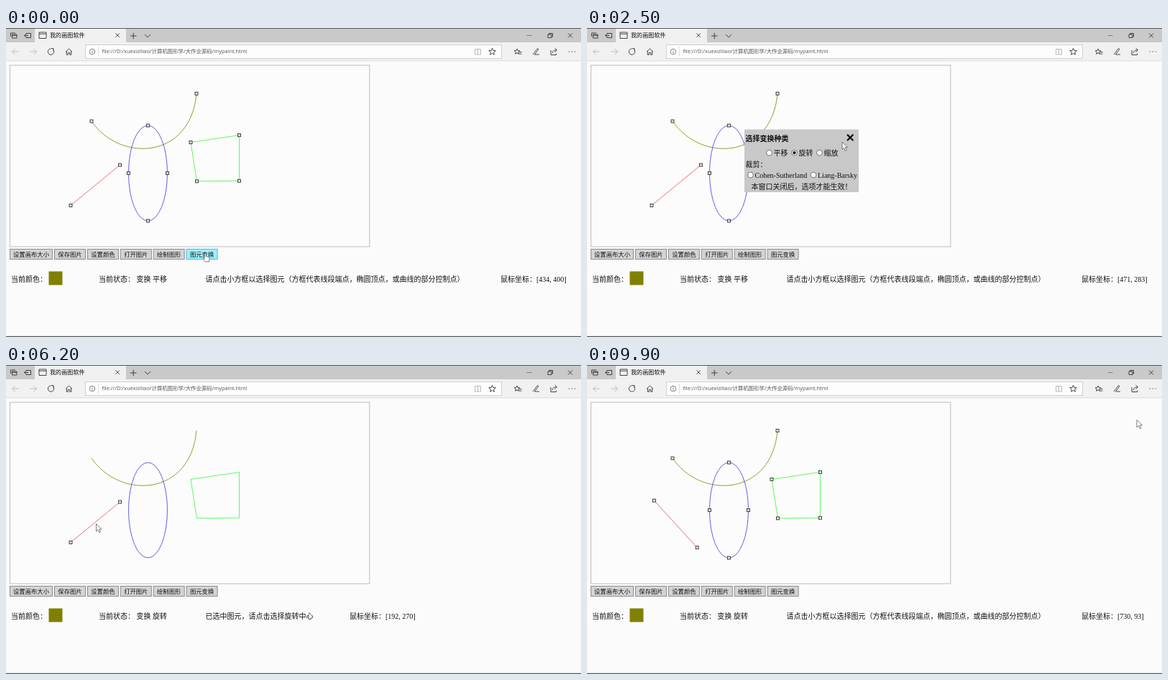
These frames come from a looping animation (800x431 px, 10 s). An HTML page:

```html
<!DOCTYPE html>
<html>
<head>
<meta charset="utf-8">
<title>我的画图软件</title>
<style>
html, body { margin: 0; width: 100%; height: 100%; overflow: hidden; background: #fbfbfb; }
svg { display: block; width: 800px; height: 431px; }
text { font: 10px 'Liberation Serif', 'Noto Sans CJK SC', 'Noto Sans CJK JP', serif; fill: #111; white-space: pre; text-spacing-trim: space-all; }
.ui { font-family: 'Open Sans', 'Noto Sans CJK SC', sans-serif; }
.ico { fill: none; stroke: #333; stroke-width: .9; }
.dim { stroke: #b4b4b4; }
.mid { stroke: #777; }
.shape { fill: none; stroke-width: .8; }
.grip { fill: #e4e4e4; stroke: #333; stroke-width: .9; }
.btn rect { fill: #d4d4d4; stroke: #8c8c8c; }
.btn.hot rect { fill: #a0eefb; stroke: #45bfe0; }
.btn text { font-size: 8.33px; }
.ring { fill: #fff; stroke: #555; stroke-width: .8; }
.ptr { fill: #fff; stroke: #555; stroke-width: .75; stroke-linejoin: round; }
</style>
</head>
<body>
<svg viewBox="0 0 800 431" xmlns="http://www.w3.org/2000/svg">
  <rect width="800" height="20" fill="#c9c9c9"/>
  <rect width="800" height="1" fill="#555"/>
  <rect x="40" y="1" width="127" height="20" fill="#f0f0f0"/>
  <rect y="20" width="800" height="26" fill="#f1f1f1"/>
  <rect y="45.5" width="800" height=".8" fill="#d8d8d8"/>
  <rect x="110.5" y="23.5" width="579" height="19" fill="#fdfdfd" stroke="#d0d0d0"/>
  <path d="M128.5 26V40" stroke="#ddd"/>
  <text class="ui" x="61" y="13.4" style="font-size:8.1px">我的画图软件</text>
  <text class="ui" x="133.5" y="35.3" style="font-size:7.4px;fill:#555">file:///D:/xuexiziliao/计算机图形学/大作业源码/mypaint.html</text>
  <g id="icons"></g>

  <rect x="5.5" y="52" width="500.3" height="253" fill="#fcfcfc" stroke="#bcbcbc"/>
  <g id="shapes"></g>
  <path class="shape" stroke="#f04a4a" id="line"/>
  <g id="others"></g>
  <g id="ends"></g>
  <g id="pivot"></g>
  <g id="buttons"></g>

  <text x="7" y="353.5">当前颜色：</text>
  <rect x="59.5" y="339.5" width="19" height="19" fill="#808000"/>
  <text x="129" y="353.5" id="mode"></text>
  <text x="277.5" y="353.5" id="hint"></text>
  <text y="353.5" id="coord"></text>

  <g id="dialog">
    <rect x="219" y="141.5" width="159" height="87.5" fill="#c8c8c8"/>
    <text x="220.5" y="158" style="font-weight:bold">选择变换种类</text>
    <text x="220.5" y="194">裁剪：</text>
    <text x="228.5" y="225">本窗口关闭后，选项才能生效！</text>
    <g id="radios"></g>
    <circle id="dot" cy="174" r="2.2" fill="#222"/>
  </g>
  <rect y="429.8" width="800" height="1.2" fill="#555"/>
  <g id="cursor">
    <path class="ptr" id="arrow" d="M.5 .5V11L3 8.7L4.7 12.7L6.5 12L4.8 8H8Z"/>
    <path class="ptr" id="hand" d="M-.8 .8Q.2 -.6 1.2 .8V4.500L5.500 5.500Q6.500 6 5.500 12H.3L-3 7.500Q-3 6 -.8 7.500Z"/>
    <path id="beam" d="M-2 -5H3M.5 -5V5M-2 5H3" fill="none" stroke="#222"/>
  </g>
</svg>
<script>
const $ = id => document.getElementById(id);
const show = (id, on) => $(id).style.display = on ? '' : 'none';

const LOOP = 10000, STEP = 100;
const OPEN = 500, PICK = 1800, CLOSE = 3000, SELECT = 4900, CENTER = 6400, TURN = 8800;

const hints = {
  choose: '请点击小方框以选择图元（方框代表线段端点，椭圆顶点，或曲线的部分控制点）',
  center: '已选中图元，请点击选择旋转中心',
  angle: '已选中旋转中心，由红色小方框标出，请点击选择旋转角度'
};

// Pointer stops: arrival time, x, y, rest
const stops = [
  [0, 277, 314, 600], [1050, 299.4, 228.9, 0], [1400, 302, 181, 0], [1700, 289, 175, 300],
  [2500, 354.5, 158.5, 0], [2800, 366, 153, 200], [3450, 155.6, 165.8, 0], [3500, 154, 169.5, 0],
  [4000, 158.8, 190.8, 1400], [6000, 125, 221, 1000], [7350, 122.5, 195.1, 50],
  [8000, 122.5, 171, 1300], [9700, 461.3, 110.1, 0], [9900, 764.5, 76, 100]
];

function pointer(t) {
  const i = stops.findLastIndex(s => s[0] <= t);
  const [at, x, y, rest] = stops[i], next = stops[i + 1];
  if (!next || t <= at + rest) return [x, y];
  const k = (t - at - rest) / (next[0] - at - rest);
  return [x + (next[1] - x) * k, y + (next[2] - y) * k];
}

// Window and toolbar icons
const ico = (d, cls = '') => `<path class="ico ${cls}" d="${d}"/>`;
const cross = (x, y, r) => `M${x - r} ${y - r}l${2 * r} ${2 * r}m0 ${-2 * r}l${-2 * r} ${2 * r}`;
const box = (x, y, w, h) => `M${x} ${y}h${w}v${h}h${-w}Z`;
const arrow = (x, dir) => `M${x} 33h${9 * dir}m${-4 * dir} -4l${4 * dir} 4l${-4 * dir} 4`;
const star = (x, y, r) => 'M' + Array.from({ length: 10 }, (_, i) => {
  const a = i * Math.PI / 5, q = i % 2 ? r * .45 : r;
  return [x + q * Math.sin(a), y - q * Math.cos(a)].map(v => v.toFixed(1));
}).join('L') + 'Z';
const dots = [0, 4, 8].map(d => `M${782.7 + d} 33h1.3`).join('');

$('icons').innerHTML =
  ico(box(8.5, 9, 6.5, 5) + 'M8.5 10.3h6.5M6.500 12V7H13') +
  ico('M28 9V7.500H34.500V13.500H28V12M31 10.500H25.500l2 -2m-2 2l2 2') +
  ico(box(46, 6, 10, 8.5) + 'M46 8.200h10') +
  ico(cross(155.2, 10.2, 2.7) + 'M173 11h8.500M177.200 6.800v8.500M193 9l4 4l4 -4') +
  ico('M724.500 10.500h7', 'mid') +
  ico(box(754, 9, 5, 4.5) + 'M755.500 9V7.500h5V12H759' + cross(785, 10.5, 3)) +
  ico(arrow(17.5, -1) + arrow(33.5, 1) + box(652.5, 29.5, 8, 7.5) + 'M656.500 29.500v7.500', 'dim') +
  ico('M65.500 30A4.200 4.200 0 1 1 62.500 28.800M63 28.500h3v3') +
  ico('M83 33.200l4.500 -4.200l4.500 4.200M84.300 32.300v5h2v-3h2.400v3h2v-5') +
  ico('M116.200 33a3.800 3.800 0 1 0 7.600 0a3.800 3.800 0 1 0 -7.600 0M120 32.300v3m0 -4.800v.9', 'mid') +
  ico(star(676.5, 33.2, 5) + star(711, 33, 4) + 'M714 33.500h3.500m-4 2.500h4') +
  ico('M733 37l6.500 -8.500l1.500 1l-5.500 7.500h6.500') +
  ico('M758 31v6.500h7.500v-2M760 35q.5 -4.200 6 -4.200m-2.500 -2.800l3 2.800l-3 2.800') +
  ico(dots);

// Drawing
const arc = [[119, 130], [159, 188.5], [257, 183], [265, 91.5]];
const oval = { x: 197.5, y: 202.5, rx: 27, ry: 66.5 };
const quad = [[257, 159.5], [324.5, 149.5], [324.5, 213.2], [265.5, 213.8]];
const segment = [[158.5, 191], [90, 247.5]], center = [125, 221];

$('shapes').innerHTML =
  `<path class="shape" stroke="#808000" d="M${arc[0]}C${arc.slice(1).join(' ')}"/>` +
  `<ellipse class="shape" stroke="#3838e6" cx="${oval.x}" cy="${oval.y}" rx="${oval.rx}" ry="${oval.ry}"/>` +
  `<path class="shape" stroke="#3cf53c" d="M${quad.join('L')}Z"/>`;

const grip = ([x, y], ink = '#333') =>
  `<rect class="grip" x="${x - 2}" y="${y - 2}" width="4" height="4" style="stroke:${ink}"/>`;
const poles = [-1, 1].flatMap(s => [[oval.x + s * oval.rx, oval.y], [oval.x, oval.y + s * oval.ry]]);
$('others').innerHTML = [arc[0], arc[3], ...poles, ...quad].map(p => grip(p)).join('');
$('pivot').innerHTML = grip(center, '#802020');

// Turn the segment towards the point clicked last
const click = pointer(TURN);
const angle = Math.atan2(click[1] - center[1], click[0] - center[0]);
const turn = ([x, y]) => {
  const dx = x - center[0], dy = y - center[1], c = Math.cos(angle), s = Math.sin(angle);
  return [center[0] + dx * c - dy * s, center[1] + dx * s + dy * c];
};

$('buttons').innerHTML = ['设置画布大小', '保存图片', '设置颜色', '打开图片', '绘制图形', '图元变换']
  .map((label, i) => {
    const x = i ? 21.6 + i * 45.9 : 5.5, w = i ? 43 : 59;
    return `<g class="btn" id="btn${i}"><rect x="${x}" y="308.5" width="${w}" height="14"/>` +
      `<text x="${x + w / 2}" y="318.6" text-anchor="middle">${label}</text></g>`;
  }).join('');

const radio = (x, y, label) => `<circle class="ring" cx="${x}" cy="${y}" r="3.9"/>` +
  `<text x="${x + 6}" y="${y + 4}">${label}</text>`;
$('radios').innerHTML =
  ['平移', '旋转', '缩放'].map((s, i) => radio(253.5 + 35 * i, 174, s)).join('') +
  ['Cohen-Sutherland', 'Liang-Barsky'].map((s, i) => radio(227.5 + 87.5 * i, 205, s)).join('') +
  `<path d="${cross(366.2, 152.8, 4.2)}" stroke="#111" stroke-width="2.3"/>`;

const inside = ([x, y], l, t, r, b) => x >= l && x <= r && y >= t && y <= b;
const isOpen = t => t >= OPEN && t < CLOSE;
const overDialog = (t, p) => isOpen(t) && inside(p, 219, 141, 378, 228.5);

// The readout keeps the last position seen on the drawing area.
function readout(t) {
  for (let u = t - 50; u >= 0; u -= 50) {
    const p = pointer(u);
    if (inside(p, 5, 52, 506, 304) && !overDialog(u, p))
      return [(p[0] - 5) * 1.6, (p[1] - 52) * 1.6].map(Math.round);
  }
  return [434, 400];
}

function draw(t) {
  const p = pointer(t), picked = t >= SELECT && t < TURN;
  const ends = t < TURN ? segment : segment.map(turn);
  $('line').setAttribute('d', 'M' + ends.join('L'));
  $('ends').innerHTML = ends.map(e => grip(e)).join('');
  show('others', !picked);
  show('pivot', t >= CENTER && t < TURN);

  show('dialog', isOpen(t));
  $('dot').setAttribute('cx', t < PICK ? 253.5 : 288.5);

  const hint = !picked ? hints.choose : t < CENTER ? hints.center : hints.angle;
  $('mode').textContent = '当前状态： 变换 ' + (t < CLOSE ? '平移' : '旋转');
  $('hint').textContent = hint;
  $('coord').textContent = `鼠标坐标：[${readout(t).join(', ')}]`;
  $('coord').setAttribute('x', 328 + hint.length * 10);

  const hot = inside(p, 251, 308, 295, 323);
  const beam = overDialog(t, p) && inside(p, 293, 168, 378, 228);
  $('btn5').classList.toggle('hot', hot);
  show('hand', hot);
  show('beam', beam);
  show('arrow', !hot && !beam);
  $('cursor').setAttribute('transform', `translate(${p})`);
}

let last = -1;
function tick() {
  const t = Math.floor(performance.now() % LOOP / STEP) * STEP;
  if (t !== last) draw(last = t);
  requestAnimationFrame(tick);
}
tick();
</script>
</body>
</html>
```
